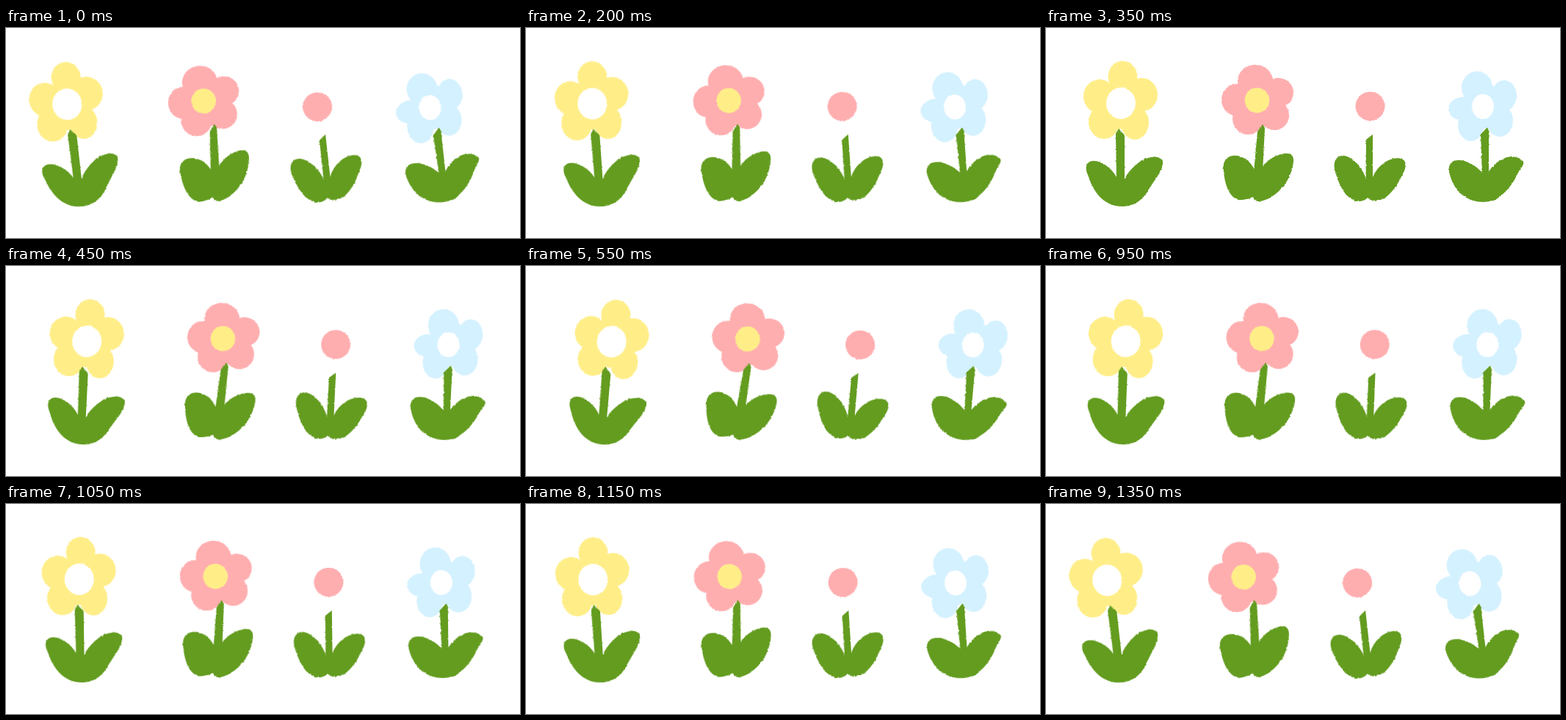
Animation, 700 px wide and 286 px high, one loop 1.4 s. Source, as an HTML page:

```html
<!DOCTYPE html>
<html lang="en">
<head>
<meta charset="utf-8">
<title>Swaying flowers</title>
<style>
  html, body { margin: 0; width: 100%; height: 100%; overflow: hidden; background: #fff; }
  svg { display: block; width: 700px; height: 286px; }
</style>
</head>
<body>
<svg id="stage" viewBox="0 0 700 286">
  <filter id="rough" color-interpolation-filters="sRGB">
    <feTurbulence type="fractalNoise" baseFrequency=".35" numOctaves="2" seed="4"/>
    <feDisplacementMap in="SourceGraphic" scale="2.5" xChannelSelector="R" yChannelSelector="G"/>
  </filter>
</svg>
<script>
const YELLOW = '#ffee88', PINK = '#ffaeb0', BLUE = '#d4f1ff', WHITE = '#fff', GREEN = '#639c1f';
const SWAY = 6.4, HEAD_SHIFT = 3.2, LOOP = 1400, STEP = 50, TURN = 700, END = 1350;

// Ellipses are [cx, cy, rx, ry]; everything is placed in the upright pose.
const flowers = [
  {
    pivot: [103, 242], petal: YELLOW, core: WHITE, disc: [102, 102.5, 20, 21.5],
    petals: [[104.5, 66, 20, 21], [73, 93, 22, 23], [130, 91, 22, 23], [79, 128, 21, 23], [121, 129, 19, 23], [101, 106, 27, 32]],
    stem: 'M99 137L95 144 96 210H107L107 146Z',
    leaves: 'M97 205C92 193 76 180 64 181C54 182 53 191 57 200C63 219 76 243 104 243C131 243 139 220 147 209C153 201 160 190 159 182C157 173 140 175 131 180C120 187 110 198 107 206Z'
  },
  {
    pivot: [286, 234], petal: PINK, core: YELLOW, disc: [287.5, 98.5, 16.8, 17],
    petals: [[285, 72, 24, 22], [260, 98, 21, 22], [316, 88, 21, 20], [275, 124, 21, 21], [311, 119, 20, 20], [290, 102, 30, 32]],
    stem: 'M295 131L288 141 283 196H295L298 136Z',
    leaves: 'M284 193C278 180 265 172 254 174C242 176 241 186 242 195C243 209 248 230 262 234C270 235 276 232 282 230C284 237 290 237 296 235C311 231 325 216 331 203C335 195 339 181 336 175C332 167 318 172 311 175C303 180 297 185 295 190Z'
  },
  {
    pivot: [439, 234], petal: WHITE, core: PINK, disc: [441.5, 106.5, 20, 19.8], petals: [],
    stem: 'M445 145L436 152 435.5 210H445Z',
    leaves: 'M436 207C432 190 415 172 402 174C391 177 391 189 395 199C400 216 410 236 427 236C433 236 436 233 438 231C441 236 450 235 456 234C469 229 479 213 486 199C490 191 492 183 486 179C478 175 467 179 460 184C452 190 446 198 444 207Z'
  },
  {
    pivot: [597, 236], petal: BLUE, core: WHITE, disc: [595, 107, 15, 17],
    petals: [[587, 81, 21, 22], [568, 110, 20, 16], [624, 92, 17, 21], [579, 132, 18, 22], [618, 126, 18, 22], [596, 106, 28, 31]],
    stem: 'M601 135L592 145 594 200H603L603 140Z',
    leaves: 'M594 197C586 187 571 179 560 180C549 181 547 190 550 200C555 219 570 237 596 237C603 236 607 236 612 234C625 226 636 212 641 201C645 193 652 186 650 182C645 175 631 173 623 178C614 182 606 189 602 198Z'
  }
];

function add(parent, tag, attrs) {
  const node = document.createElementNS('http://www.w3.org/2000/svg', tag);
  for (const name in attrs) node.setAttribute(name, attrs[name]);
  return parent.appendChild(node);
}

const ellipse = (parent, [cx, cy, rx, ry], fill) => add(parent, 'ellipse', { cx, cy, rx, ry, fill });

for (const flower of flowers) {
  flower.body = add(stage, 'g', {});
  const rough = add(flower.body, 'g', { filter: 'url(#rough)' });
  flower.head = add(rough, 'g', {});
  for (const petal of flower.petals) ellipse(flower.head, petal, flower.petal);
  ellipse(flower.head, flower.disc, flower.core);
  add(rough, 'path', { d: flower.stem + flower.leaves, fill: GREEN });
}

// -1 is fully left, 1 is fully right.
function swayAt(time) {
  const t = Math.floor(time % LOOP / STEP) * STEP;
  return t < TURN ? -Math.cos(Math.PI * t / TURN) : Math.cos(Math.PI * (t - TURN) / (END - TURN));
}

function draw() {
  const sway = swayAt(performance.now());
  for (const { body, head, pivot } of flowers) {
    body.setAttribute('transform', `rotate(${sway * SWAY} ${pivot})`);
    head.setAttribute('transform', `translate(${sway * HEAD_SHIFT} 0)`);
  }
  requestAnimationFrame(draw);
}
draw();
</script>
</body>
</html>
```
